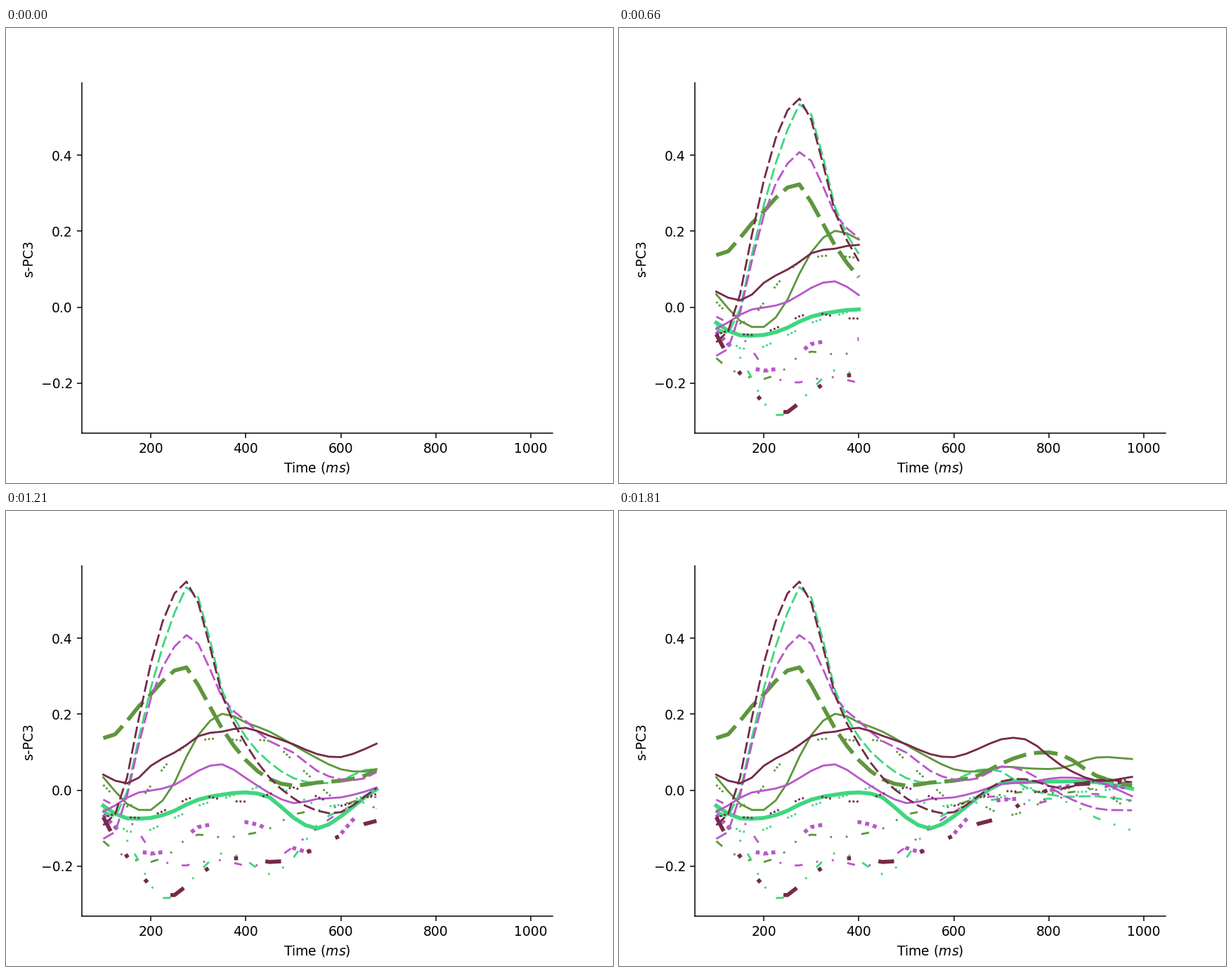
Write a matplotlib script that moves like this. It is 864x648 px and loops after 1.86 s.

```python
import numpy as np
import matplotlib.pyplot as plt
from matplotlib.animation import FuncAnimation

STEP = 25
TICK = 10  # ms per animation step
LOOP = 1860

MAROON, GREEN, OLIVE, PURPLE = "#752a48", "#3fd67f", "#5e963c", "#b956cb"
THIN, THICK = 1.5, 3
SOLID = "-"
DASHED = (0, (6, 2))
DOTTED = (0, (1, 1, 1, 1, 1, 9))
DASHDOT = (0, (4, 7, 1, 7, 1, 7))

# Sample positions of the control values, in units of STEP
KNOTS = np.array([0, 1, 2, 3, 4, 6, 7, 8, 10, 12, 14, 16, 18, 20, 22, 24, 26, 29, 32, 35])
samples = np.arange(36)
time = 100 + STEP * samples


def hermite(t, y, x):
    """Smooth cubic interpolation through the points (t, y)."""
    m = np.gradient(y, t)
    i = np.clip(np.searchsorted(t, x, "right") - 1, 0, len(t) - 2)
    h = t[i + 1] - t[i]
    s = (x - t[i]) / h
    return (
        (2 * s**3 - 3 * s**2 + 1) * y[i]
        + (s**3 - 2 * s**2 + s) * h * m[i]
        + (3 * s**2 - 2 * s**3) * y[i + 1]
        + (s**3 - s**2) * h * m[i + 1]
    )


fig, ax = plt.subplots(figsize=(6.4, 4.8), dpi=135)
ax.set(
    xlim=(55, 1045),
    ylim=(-0.331, 0.591),
    xticks=range(200, 1001, 200),
    yticks=[-0.2, 0, 0.2, 0.4],
    xlabel="Time ($ms$)",
    ylabel="s-PC3",
)
ax.spines[["top", "right"]].set_visible(False)

traces = []


def trace(color, style, width, *milli):
    """Add one curve, given by its values at KNOTS in thousandths."""
    y = hermite(KNOTS, np.array(milli) / 1000, samples)
    line, = ax.plot([], [], color=color, ls=style, lw=width)
    traces.append((line, y))


trace(GREEN, SOLID, THICK, -41, -62, -74, -75, -73, -54, -38, -25, -12, -6,
      -19, -72, -101, -69, -19, 18, 21, 23, 21, 4)
trace(GREEN, DASHED, THIN, -55, -70, -5, 138, 268, 467, 534, 507, 263, 140,
      73, 32, 18, 25, 53, 49, 8, -16, -16, -27)
trace(GREEN, DASHDOT, THIN, -54, -91, -132, -187, -252, -283, -250, -217, -165, -184,
      -221, -178, -91, -52, -32, -23, -27, -25, -73, -106)
trace(GREEN, DOTTED, THIN, -50, -86, -108, -112, -104, -73, -58, -41, -23, -3,
      14, -10, -40, -38, -15, -19, 5, -5, -2, 10)

trace(OLIVE, SOLID, THIN, 34, -3, -36, -52, -52, 20, 88, 145, 201, 178,
      154, 119, 84, 55, 49, 62, 58, 58, 86, 82)
trace(OLIVE, DASHED, THICK, 137, 147, 182, 221, 252, 315, 323, 276, 162, 79,
      29, 12, 20, 25, 38, 70, 93, 94, 38, 12)
trace(OLIVE, DASHDOT, THIN, -134, -161, -176, -187, -189, -158, -126, -117, -125, -117,
      -101, -64, -54, -41, -21, -12, -4, -8, 5, 15)
trace(OLIVE, DOTTED, THIN, 14, -19, -43, -32, 12, 93, 119, 130, 136, 129,
      130, 77, 18, -34, -32, -65, -56, 1, 1, -56)

trace(PURPLE, SOLID, THIN, -57, -40, -20, -6, -1, 14, 32, 51, 68, 32,
      -8, -34, -23, -19, -4, 16, 20, 33, 24, -16)
trace(PURPLE, DASHED, THIN, -128, -110, -15, 122, 241, 378, 408, 385, 244, 182,
      129, 99, 51, 28, 31, 62, 50, -10, -48, -53)
trace(PURPLE, DASHDOT, THIN, -25, -41, -71, -112, -160, -198, -198, -191, -184, -199,
      -189, -149, -100, -56, -25, -16, -37, -20, -10, -30)
trace(PURPLE, DOTTED, THICK, -64, -97, -134, -161, -167, -148, -120, -97, -91, -84,
      -104, -152, -160, -115, -45, -25, -22, 8, 14, 5)

trace(MAROON, SOLID, THIN, 41, 25, 18, 33, 64, 99, 119, 142, 154, 164,
      143, 121, 95, 87, 108, 134, 134, 66, 25, 35)
trace(MAROON, DASHED, THIN, -92, -63, 33, 190, 333, 518, 549, 493, 250, 121,
      33, -21, -54, -58, -17, 23, 29, 5, 27, 21)
trace(MAROON, DASHDOT, THICK, -71, -130, -174, -215, -254, -276, -252, -224, -187, -178,
      -189, -180, -149, -119, -89, -71, -27, 10, 18, 23)
trace(MAROON, DOTTED, THIN, -72, -62, -71, -73, -68, -40, -24, -15, -25, -30,
      -10, 7, -17, -41, -21, -2, -6, 3, 25, 27)


def update(k):
    # One more sample every 50 ms, after a short lead-in
    n = max(0, (k - 1) // 5)
    for line, y in traces:
        line.set_data(time[:n], y[:n])
    return [line for line, _ in traces]


anim = FuncAnimation(
    fig, update, frames=LOOP // TICK, interval=TICK,
    init_func=lambda: update(0), repeat=True, repeat_delay=0,
)
plt.show()
```
